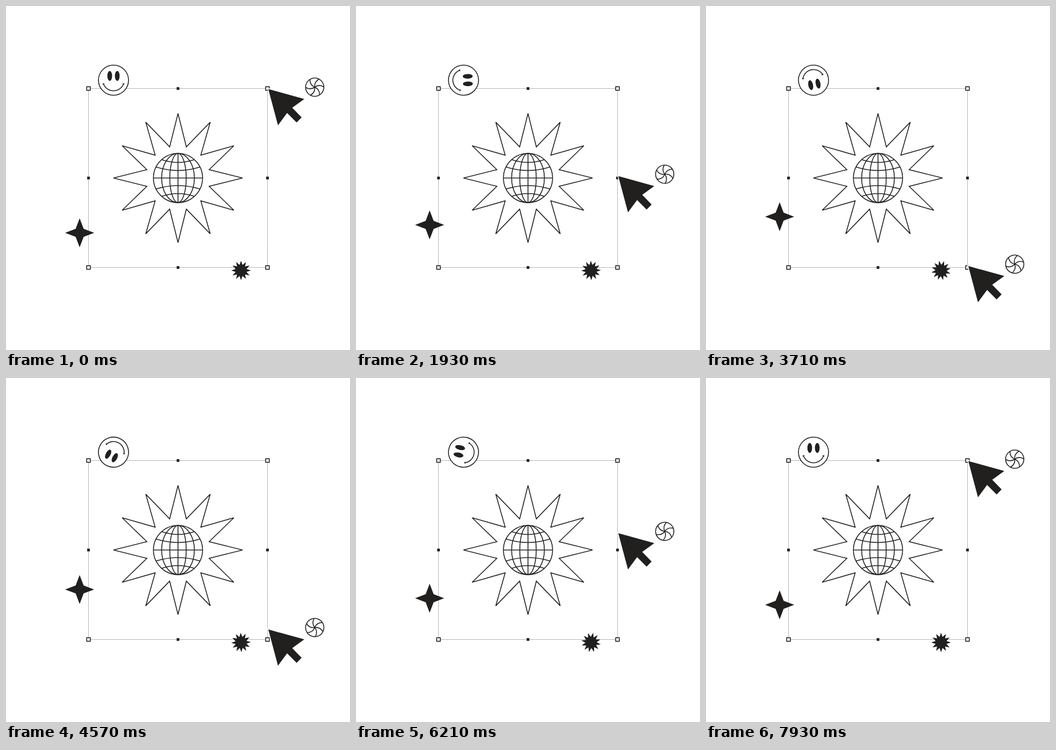
An HTML page for the animation above (8000 ms loop, 640 px wide and 640 px high).

```html
<!DOCTYPE html>
<html>
<head>
<meta charset="utf-8">
<style>
html, body { margin: 0; width: 100%; height: 100%; overflow: hidden; background: #fff; }
svg { display: block; width: 100%; height: 100%; fill: none; stroke: #21201f; stroke-width: 1.6; }
.solid { fill: #21201f; stroke: none; }
.paper { fill: #fff; }
</style>
</head>
<body>
<svg viewBox="0 0 640 640">
  <rect x="153.5" y="153.5" width="333" height="333" stroke-width="1" stroke-dasharray="1 2"/>
  <g id="handles"></g>

  <path id="sun"/>
  <g transform="translate(320 320)">
    <circle r="45.7"/>
    <ellipse rx="30.5" ry="45.7"/>
    <ellipse rx="15.3" ry="45.7"/>
    <path d="M0-45.7V45.7M-45.7 0H45.7
      M-41-20.5Q0-7.5 41-20.5M-30-34Q0-24 30-34
      M-41 20.5Q0 7.5 41 20.5M-30 34Q0 24 30 34"/>
  </g>

  <g id="smiley">
    <circle class="paper" r="28"/>
    <ellipse class="solid" cx="-7" cy="-8" rx="4.4" ry="9.3"/>
    <ellipse class="solid" cx="7" cy="-8" rx="4.4" ry="9.3"/>
    <path d="M-18.7 6.7A19.9 19.9 0 0 0 18.7 6.7M-20.3 7.2L-17 6.2M20.3 7.2L17 6.2"/>
  </g>
  <path id="sparkle" class="solid"/>
  <path id="burst" class="solid"/>
  <path id="cursor" fill="#21201f" stroke="#fff" stroke-width="3" paint-order="stroke"
    d="M488 154.5L555 173L532.5 189.3L550 207.3L540.7 216.8L523 199L506 222Z"/>
  <g id="wheel"><circle class="paper" r="17"/></g>
</svg>
<script>
const $ = id => document.getElementById(id);
const place = (id, x, y, turn = 0) =>
  $(id).setAttribute('transform', `translate(${x} ${y}) rotate(${turn})`);

function star(tips, outer, inner, cx = 0, cy = 0) {
  const points = [];
  for (let i = 0; i < tips * 2; i++) {
    const a = i * Math.PI / tips, r = i % 2 ? inner : outer;
    points.push([cx + r * Math.sin(a), cy - r * Math.cos(a)]);
  }
  return 'M' + points.join('L') + 'Z';
}

$('sun').setAttribute('d', star(12, 120, 60, 320, 320));
$('sparkle').setAttribute('d', star(4, 27, 10.5));
$('burst').setAttribute('d', star(12, 18.3, 10.5));

for (const x of [153.5, 320, 486.5]) for (const y of [153.5, 320, 486.5]) {
  if (x === 320 && y === 320) continue;
  const corner = x !== 320 && y !== 320, size = corner ? 6.6 : 5;
  $('handles').innerHTML += `<rect class="${corner ? 'paper' : 'solid'}"
    x="${x - size / 2}" y="${y - size / 2}" width="${size}" height="${size}"/>`;
}
for (let i = 0; i < 6; i++)
  $('wheel').innerHTML += `<path d="M0 0Q8-6 17-.5" transform="rotate(${i * 60})"/>`;

const LAST = 199, TURN = 100;

function draw(now) {
  // 14 pictures a second, each showing a moment of a 25 per second timeline
  const step = Math.floor((now % 8000 + 5) * .014) % 112;
  const pos = Math.ceil(step * 25 / 14);
  const s = pos < TURN ? pos / TURN : (LAST - pos) / (LAST - TURN);
  const ease = s * s * (3 - 2 * s);
  const angle = pos / LAST * 360;
  const drop = 334 * ease;
  place('cursor', 0, drop);
  place('wheel', 574.4, 151 + drop, angle);
  place('smiley', 200, 138, angle);
  place('burst', 437.3, 492, angle);
  place('sparkle', 137, 422 - 30.5 * ease);
}

const start = performance.now();
function tick() {
  draw(performance.now() - start);
  requestAnimationFrame(tick);
}
tick();
</script>
</body>
</html>
```
